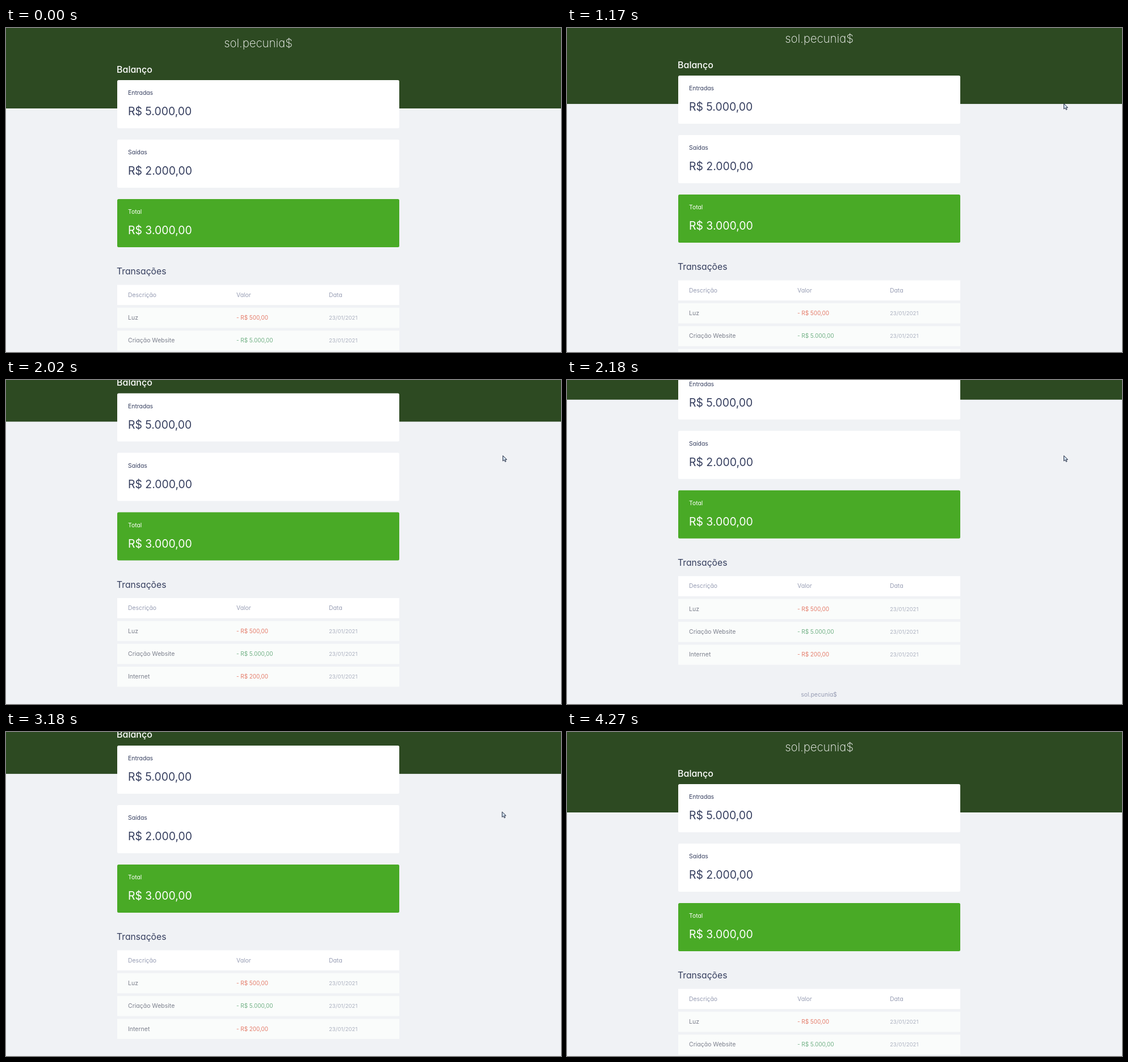
An HTML page for the animation above (4.74 s loop, 978 by 572 pixels).

```html
<!DOCTYPE html>
<html lang="pt-BR">
<head>
<meta charset="utf-8">
<title>Balanço</title>
<style>
  html, body { margin: 0; width: 100%; height: 100%; overflow: hidden; background: #f0f2f5; }
  svg { display: block; width: 978px; height: 572px; }
  text { font-family: Inter, "Open Sans", sans-serif; font-feature-settings: "cv11"; white-space: pre; }
</style>
</head>
<body>
<svg id="stage" viewBox="0 0 978 572">
  <g id="page"></g>
  <path id="cursor" d="M.6 .6V10L2.9 8 4.5 11.4 6.1 10.7 4.6 7.4H7.5Z"
        fill="#d3e3f3" stroke="#232c42" stroke-linejoin="round"/>
</svg>
<script>
const LOOP = 4740, TICK = 75;
const INK = '#363f5f', MUTED = '#969cb3', RED = '#e47b69', GREEN = '#70b084';
const page = document.getElementById('page');
const cursor = document.getElementById('cursor');

function add(tag, attrs, content = '') {
  const node = document.createElementNS('http://www.w3.org/2000/svg', tag);
  for (const key in attrs) node.setAttribute(key, attrs[key]);
  node.textContent = content;
  page.appendChild(node);
}
const box = (x, y, width, height, fill, rx = 0) => add('rect', { x, y, width, height, fill, rx });
const label = (x, y, size, fill, content, extra = {}) =>
  add('text', { x, y, 'font-size': size, fill, ...extra }, content);

function card(index, title, amount, fill, ink) {
  const y = 92 + index * 105;
  box(196, y, 497, 85, fill, 2.5);
  label(215, y + 26, 10.4, ink, title);
  label(215, y + 62, 19.4, ink, amount);
}

function row(index, cells, fill, colors, sizes) {
  const y = 453.5 + index * 40.35;
  box(196, y, 497, 35.5, fill);
  [215, 406, 569].forEach((x, i) => label(x, y + 21.2, sizes[i], colors[i], cells[i]));
}

box(0, 0, 978, 142, '#2d4a22');
label(444.5, 34, 20.4, '#fff', 'sol.pecunia$', { 'text-anchor': 'middle', 'font-weight': 200 });
label(195, 78.5, 16, '#fff', 'Balanço', { 'font-weight': 500 });
card(0, 'Entradas', 'R$ 5.000,00', '#fff', INK);
card(1, 'Saídas', 'R$ 2.000,00', '#fff', INK);
card(2, 'Total', 'R$ 3.000,00', '#49aa26', '#fff');
label(195, 435, 15.7, INK, 'Transações');
row(0, ['Descrição', 'Valor', 'Data'], '#fff', [MUTED, MUTED, MUTED], [10.4, 10.4, 10.4]);
[
  ['Luz', '- R$ 500,00', RED],
  ['Criação Website', '- R$ 5.000,00', GREEN],
  ['Internet', '- R$ 200,00', RED],
].forEach(([name, value, color], i) =>
  row(i + 1, [name, value, '23/01/2021'], '#fafcfb', ['#7b7f8c', color, '#adb2c1'], [10.5, 9.9, 9.6]));
label(444, 666, 10.4, MUTED, 'sol.pecunia$', { 'text-anchor': 'middle' });

// Eased progress, sampled on ticks; a gesture is already under way at its first tick.
function glide(t, start, end) {
  if (t < start) return 0;
  const elapsed = Math.floor((t - start) / TICK) * TICK;
  const u = Math.min(1, 0.225 + 0.775 * elapsed / (end - start));
  return u * u * (3 - 2 * u);
}

// Wheel notches
const notches = [
  { start: 1170, end: 1320, by: 61.5 },
  { start: 2020, end: 2240, by: 54 },
  { start: 3030, end: 3283, by: -62 },
  { start: 3255, end: 3390, by: -53.5 },
];
const scrollAt = t =>
  notches.reduce((sum, { start, end, by }) => sum + by * glide(t, start, end), 0);

// Pointer gestures: a long sweep in, small drifts, and the way out
const origin = { x: 1010, y: 624 };
const gestures = [
  { start: 70, end: 460, x: 881, y: 141, bend: -142 },
  { start: 690, end: 770, x: 875, y: 133 },
  { start: 2710, end: 2810, x: 873, y: 140 },
  { start: 3110, end: 3340, x: 878, y: 142.5 },
  { start: 3720, end: 4170, x: 961, y: 550 },
];
function pointerAt(t) {
  let { x, y } = origin;
  for (const { start, end, x: toX, y: toY, bend = 0 } of gestures) {
    const p = glide(t, start, end);
    x += (toX - x) * p + bend * 4 * p * (1 - p);
    y += (toY - y) * p;
  }
  return [x, y];
}

function render(t) {
  page.setAttribute('transform', `translate(0 ${-scrollAt(t)})`);
  cursor.setAttribute('transform', `translate(${pointerAt(t)})`);
  cursor.setAttribute('visibility', t >= 70 && t < 4270 ? 'visible' : 'hidden');
}

const start = performance.now();
function frame() {
  render((performance.now() - start) % LOOP);
  requestAnimationFrame(frame);
}
frame();
</script>
</body>
</html>
```
